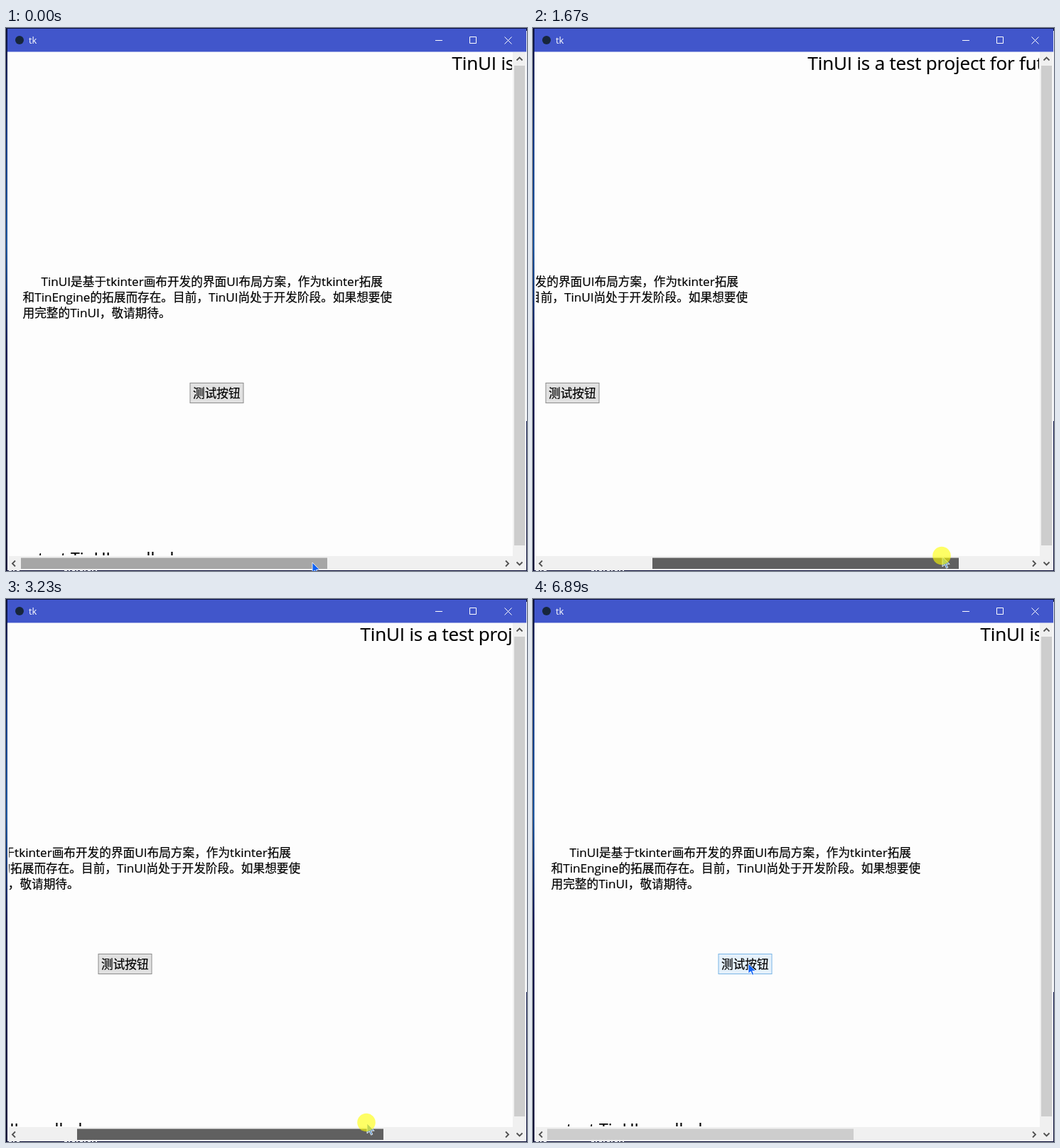
An HTML page for the animation above (8 s loop, 733 by 764 pixels).

```html
<!DOCTYPE html>
<html lang="zh-CN">
<head>
<meta charset="utf-8">
<title>tk</title>
<style>
  html, body { margin: 0; width: 100%; height: 100%; overflow: hidden; background: #0b1238; }
  svg { display: block; width: 733px; height: 764px; }
  text { font-family: "Open Sans", "Noto Sans CJK SC", "Noto Sans CJK", sans-serif; white-space: pre; }
  #page text { stroke: #000; stroke-width: .2; }
  .body { font-size: 16.67px; }
  .body tspan { font-size: 17.15px; }
  .line { fill: none; stroke: #fff; }
  .chevron { fill: none; stroke: #505050; stroke-width: 1.8; }
</style>
</head>
<body>
<svg viewBox="0 0 733 764">
  <defs>
    <clipPath id="view"><rect x="4" y="34" width="708" height="708"/></clipPath>
    <linearGradient id="desk" x2="0" y2="1">
      <stop offset="0" stop-color="#0a0f3a"/>
      <stop offset=".2" stop-color="#123a86"/>
      <stop offset=".4" stop-color="#1c56a0"/>
      <stop offset=".6" stop-color="#0b1550"/>
      <stop offset="1" stop-color="#0a0d38"/>
    </linearGradient>
  </defs>

  <rect width="733" height="764" fill="url(#desk)"/>
  <rect x="732" y="4" width="1" height="549" fill="#e8ebf2"/>
  <rect x="2" y="33" width="730" height="730" fill="#fdfdfd"/>
  <rect x="2" y="1" width="730" height="32.5" fill="#4156cb"/>
  <circle cx="19" cy="17" r="6" fill="#17263c"/>
  <text x="32" y="22" font-size="13" fill="#fff">tk</text>
  <path class="line" d="M604 17.5h10M652.5 12.5h9v9h-9zM701.5 12.5l10 10m0-10l-10 10"/>

  <g clip-path="url(#view)">
    <g id="page">
      <text x="627.5" y="59" font-size="26" letter-spacing="-.16">TinUI is a test project for futher tin using</text>
      <text class="body" x="49.5" y="363">TinUI是基于tkinter画布开发的界面UI布局方案，作为tkinter拓展</text>
      <text class="body" x="23.5" y="385">和TinEngine的拓展而存在。目前，TinUI尚处于开发阶段。如果想要使</text>
      <text class="body" x="23.5" y="407">用完整的TinUI，敬请期待。</text>
      <rect id="button" x="259" y="499.5" width="75" height="28"/>
      <text class="body" x="263" y="520">测试按钮</text>
      <text x="45" y="755" font-size="23">test TinUI scrolled</text>
    </g>
  </g>

  <path fill="#f0f0f0" d="M713 34h18v729h-18zM3 743h728v20H3z"/>
  <rect x="715" y="53" width="15" height="675" fill="#cdcdcd"/>
  <rect id="thumb" y="745.5" width="431" height="15.5"/>
  <path class="chevron" d="M718.5 45.5l4-4 4 4M718.5 751.5l4 4 4-4M13 749.5l-4 4 4 4M703 749.5l4 4-4 4"/>
  <path stroke="#dfe3ee" stroke-dasharray="4 2 2 3" d="M4 763.5h17M82 763.5h46"/>

  <path id="arrow" d="M0 0V14L3.3 11L5.6 16.2L7.8 15.2L5.6 10.3H10.2Z" stroke="#fff" stroke-width=".8"/>
  <circle id="press" r="12.8" fill="#ff0" fill-opacity=".6"/>
</svg>
<script>
const LOOP = 8000, STEP = 77;
const PRESS = 750, DRAG = 900, RELEASE = 3700;
const GRIP = 408, BAR_MIN = 20, BAR_MAX = 265, BAR_START = 21, RATIO = 1.638;

// pointer moves; ease is the ease-out power
const moves = [
  { from: PRESS, to: PRESS, x: 429, y: 752 },
  { from: DRAG, to: 1670, x: 576, y: 744 },
  { from: 1750, to: 2450, x: 698, y: 738, ease: 1.25 },
  { from: 2860, to: 3640, x: 424, y: 738, ease: 1.5 },
  { from: RELEASE, to: 3870, x: 408, y: 737 },
  { from: 4170, to: 4870, x: 303, y: 510 },
  { from: 5350, to: 5570, x: 298, y: 466, ease: 2 },
  { from: 5800, to: 6110, x: 304, y: 519 },
  { from: 6570, to: 6890, x: 303, y: 513 }
];

const $ = id => document.getElementById(id);
const set = (el, attrs) => { for (const k in attrs) el.setAttribute(k, attrs[k]); };
const clamp = (v, lo, hi) => Math.max(lo, Math.min(hi, v));
const [page, button, thumb, arrow, press] = ['page', 'button', 'thumb', 'arrow', 'press'].map($);

// Latin runs are slightly larger than the Chinese glyphs
for (const el of document.querySelectorAll('.body'))
  el.innerHTML = el.textContent.replace(/[A-Za-z]+/g, '<tspan>$&</tspan>');

// the screen refreshes once per STEP while the pointer moves
function pointer(t) {
  let x = 431, y = 752;
  for (const m of moves) {
    if (t < m.from) break;
    const count = Math.round((m.to - m.from) / STEP) + 1;
    const done = Math.min(count, Math.floor((t - m.from) / STEP + .27) + 1);
    const p = 1 - (1 - done / count) ** (m.ease || 1);
    x += (m.x - x) * p;
    y += (m.y - y) * p;
  }
  return [Math.round(x), Math.round(y)];
}

function draw(t) {
  const [x, y] = pointer(t);
  const down = t >= PRESS && t < RELEASE;
  const bar = t < DRAG ? BAR_START : down ? clamp(x - GRIP, BAR_MIN, BAR_MAX) : BAR_MIN;
  const dx = Math.round((BAR_START - bar) * RATIO);
  const over = y >= 499 && y < 528 && x >= 259 + dx && x < 334 + dx;

  set(page, { transform: `translate(${dx})` });
  set(thumb, { x: bar, fill: t < DRAG ? '#a6a6a6' : down ? '#606060' : '#cdcdcd' });
  set(button, { fill: over ? '#e5f1fb' : '#e1e1e1', stroke: over ? '#7ab5e6' : '#8c8c8c' });
  set(arrow, { transform: `translate(${x} ${y})`, fill: down ? '#5f93c8' : '#0f62f5' });
  set(press, { cx: x - 1, cy: y - 1.5, visibility: down ? 'visible' : 'hidden' });
}

const start = performance.now();
function tick() {
  draw((performance.now() - start) % LOOP);
  requestAnimationFrame(tick);
}
tick();
</script>
</body>
</html>
```
